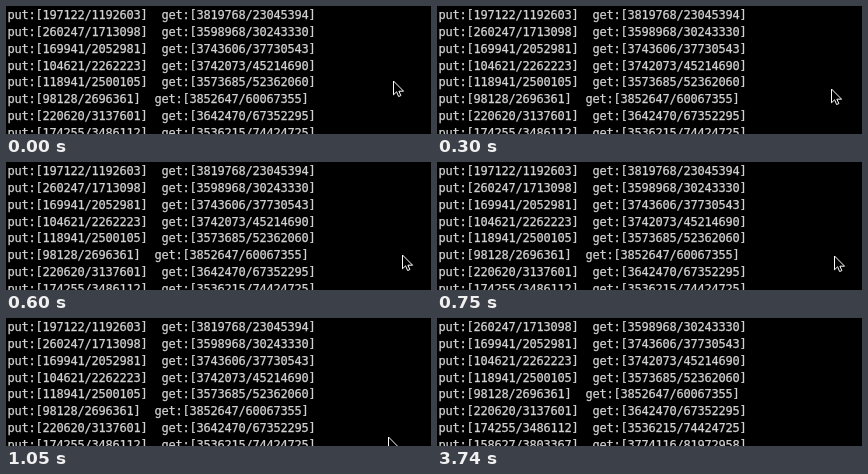
Animation, 425 px wide and 128 px high, one loop 8000 ms. Source, as an HTML page:

```html
<!DOCTYPE html>
<html lang="en">
<head>
<meta charset="utf-8">
<title>Put and get counters</title>
<style>
  html, body { margin: 0; width: 100%; height: 100%; overflow: hidden; background: #000; }
  svg { display: block; }
  text {
    font: 12px "DejaVu Sans Mono", "Noto Sans Mono", monospace;
    letter-spacing: -0.224px;
    fill: #d2d2d2;
    stroke: #d2d2d2;
    stroke-width: 0.25px;
    white-space: pre;
  }
</style>
</head>
<body>
<svg width="425" height="128" viewBox="0 0 425 128">
  <g id="log"></g>
  <path id="cursor" fill="#000" stroke="#fff" stroke-width="1"
    d="M.5 1V14.8L3.6 11.8L5.6 16.5L7.9 15.6L5.9 11.2H10.6Z"/>
</svg>
<script>
const LOOP = 8000, SCROLL_AT = 3740, ROWS = 8;
const LEFT = 1.5, BASE = 13, PITCH = 16.85;

const entries = [
  ["197122/1192603", "3819768/23045394"],
  ["260247/1713098", "3598968/30243330"],
  ["169941/2052981", "3743606/37730543"],
  ["104621/2262223", "3742073/45214690"],
  ["118941/2500105", "3573685/52362060"],
  ["98128/2696361", "3852647/60067355"],
  ["220620/3137601", "3642470/67352295"],
  ["174255/3486112", "3536215/74424725"],
  ["158627/3803367", "3774116/81972958"]
];

// pointer tip: time, x, y
const steps = [
  [0, 387, 74], [150, 388, 74], [300, 394, 82], [450, 396, 89],
  [600, 396, 92], [750, 397, 93], [900, 393, 101], [1050, 382, 118],
  [1200, 382, 140]
];

const log = document.getElementById("log");
const cursor = document.getElementById("cursor");

const rows = Array.from({ length: ROWS }, (_, i) => {
  const row = document.createElementNS("http://www.w3.org/2000/svg", "text");
  row.setAttribute("x", LEFT);
  row.setAttribute("y", Math.round(BASE + i * PITCH));
  log.append(row);
  return row;
});

let first = -1;
function showLog(start) {
  if (start === first) return;
  first = start;
  rows.forEach((row, i) => {
    const [put, get] = entries[start + i];
    row.textContent = `put:[${put}]  get:[${get}]`;
  });
}

function draw(t) {
  showLog(t < SCROLL_AT ? 0 : 1);
  const [, x, y] = steps.filter(s => s[0] <= t).pop();
  cursor.setAttribute("transform", `translate(${x} ${y})`);
}

const began = performance.now();
function tick() {
  draw((performance.now() - began) % LOOP);
  requestAnimationFrame(tick);
}
tick();
</script>
</body>
</html>
```
